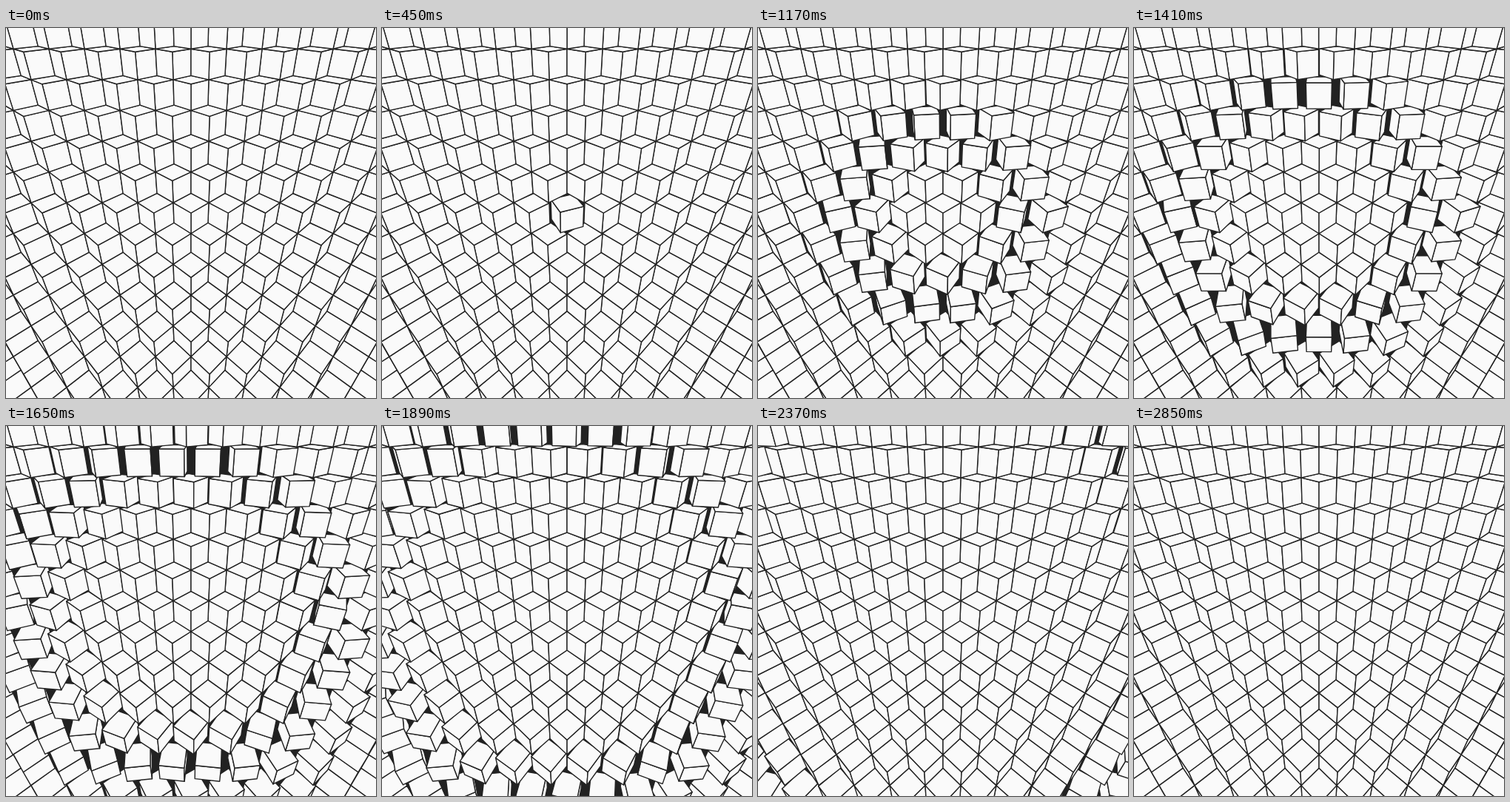
These frames come from a looping animation (500x500 px, 2.88 s). An HTML page with a canvas:

```html
<!DOCTYPE html>
<html lang="en">
<head>
<meta charset="utf-8">
<title>Cube ripple</title>
<style>
html, body { margin: 0; width: 100%; height: 100%; overflow: hidden; background: #222; }
canvas { display: block; width: 500px; height: 500px; }
</style>
</head>
<body>
<canvas id="stage" width="500" height="500"></canvas>
<script>
const ctx = document.getElementById('stage').getContext('2d');
const LOOP = 2880, STEP = 30, TURN = 1152;   // ms
const SPEED = 0.1955;                        // ripple, px per ms
const SIDE = 33.2;
const EYE = 250 / Math.tan(Math.PI / 6);
const COS = Math.sqrt(2 / 3), SIN = Math.sqrt(1 / 3);   // isometric tilt
const COL = SIDE * Math.SQRT2, ROW = COL * Math.sqrt(3) / 2;
const RADIUS = SIDE / Math.SQRT2;

// Lower layers come first, and within a layer the outermost cubes.
const cubes = [];
for (let row = 8; row >= -8; row--) {
  const line = [];
  for (let col = -8; col <= 8; col++) {
    const x = (col + (row & 1) / 2) * COL, y = row * ROW;
    line.push({ x, y, delay: Math.hypot(x, y) / SPEED });
  }
  line.sort((a, b) => Math.abs(b.x) - Math.abs(a.x));
  cubes.push(...line);
}

const clamp = p => Math.min(1, Math.max(0, p));
const ease = p => p < 0.5 ? 4 * p ** 3 : 1 - 4 * (1 - p) ** 3;

function project(cube, angle, up) {
  const depth = RADIUS * Math.cos(angle);
  const x = cube.x + RADIUS * Math.sin(angle);
  const y = cube.y - up * COS + depth * SIN;
  const scale = EYE / (EYE - up * SIN - depth * COS);
  return [250 + x * scale, 250 + y * scale];
}

function facesEye([a, b, c]) {
  return (b[0] - a[0]) * (c[1] - a[1]) - (b[1] - a[1]) * (c[0] - a[0]) > 0;
}

function drawFace(points) {
  if (!facesEye(points)) return;
  ctx.beginPath();
  points.forEach(p => ctx.lineTo(...p));
  ctx.closePath();
  ctx.fill();
  ctx.stroke();
}

function drawCube(cube, time) {
  const turn = ease(clamp((time - cube.delay) / TURN)) * Math.PI / 2;
  const ring = up => [0, 1, 2, 3].map(i => project(cube, i * Math.PI / 2 - turn, up));
  const top = ring(SIDE / 2), base = ring(-SIDE / 2);
  for (let i = 0; i < 4; i++) {
    const j = (i + 1) % 4;
    drawFace([top[i], top[j], base[j], base[i]]);
  }
  drawFace(top.slice().reverse());
}

function render(time) {
  ctx.fillStyle = '#222';
  ctx.fillRect(0, 0, 500, 500);
  ctx.fillStyle = '#fafafa';
  ctx.strokeStyle = '#222';
  ctx.lineWidth = 1.4;
  ctx.lineJoin = 'round';
  cubes.forEach(cube => drawCube(cube, time));
}

const start = performance.now();
function tick() {
  const time = (performance.now() - start) % LOOP;
  render(Math.floor(time / STEP) * STEP);
  requestAnimationFrame(tick);
}
tick();
</script>
</body>
</html>
```
